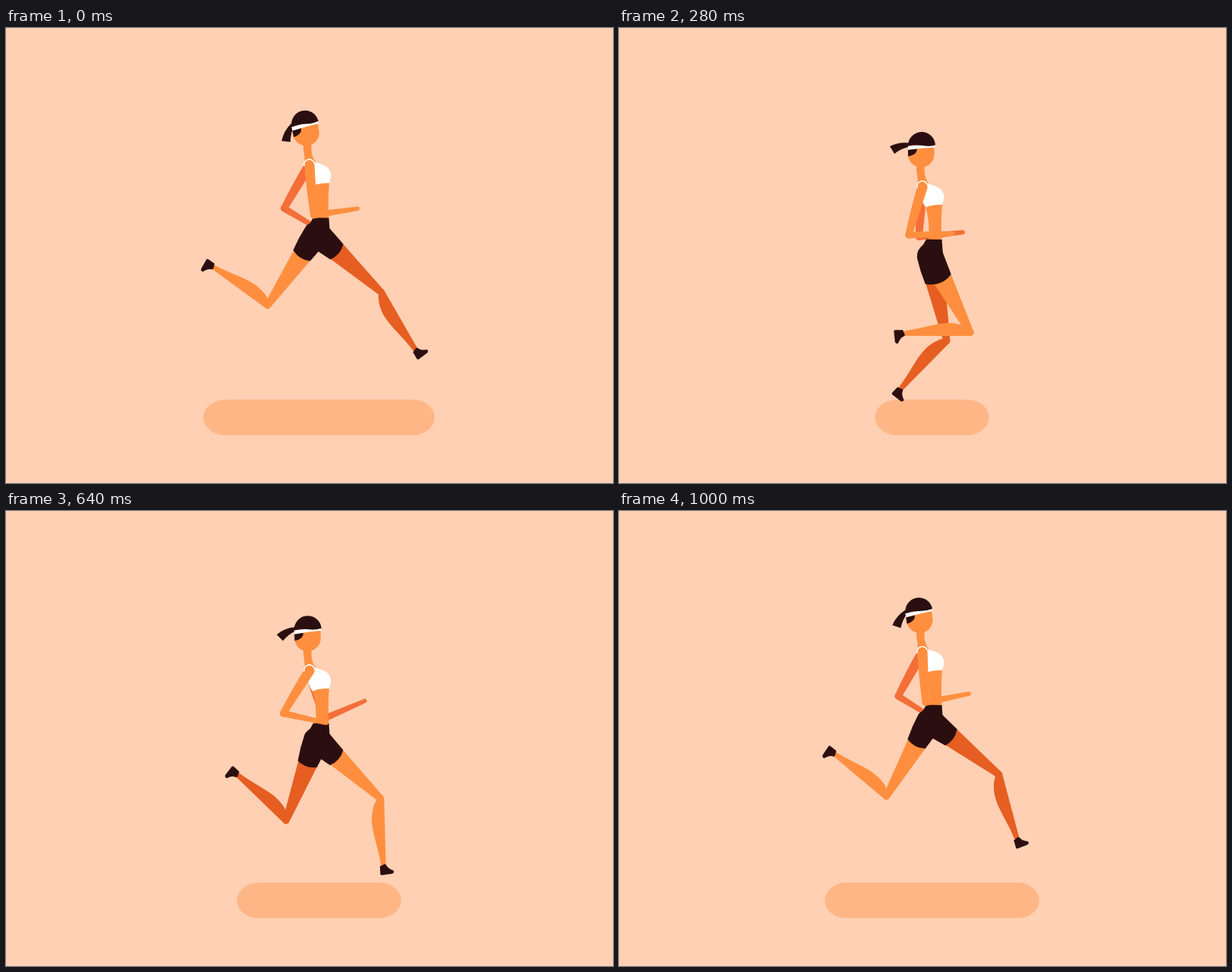
Animation, 800 px wide and 600 px high, one loop 1.04 s. Source, as an HTML page with a canvas:

```html
<!DOCTYPE html>
<html lang="en">
<head>
<meta charset="utf-8">
<title>Runner</title>
<style>
  html, body { margin: 0; width: 100%; height: 100%; overflow: hidden; background: #ffd0b3; }
  canvas { display: block; }
</style>
</head>
<body>
<canvas id="stage" width="800" height="600"></canvas>
<script>
const ctx = document.getElementById('stage').getContext('2d');
const LOOP = 1040, STEP = 40, HALF = 560;
const SKIN = '#ff8f3f', FAR_ARM = '#f46e38', FAR_LEG = '#e65e22', DARK = '#2b0f10';
const { PI, sin, cos } = Math;

// Linear motion through a few key points, closing on the first.
const keys = (times, ...values) => t => {
  const i = times.findLastIndex(time => time <= t);
  const end = times[i + 1] ?? LOOP, next = values[i + 1] ?? values[0];
  return values[i] + (next - values[i]) * (t - times[i]) / (end - times[i]);
};

// The two strides differ in length; each covers half a turn of the gait.
const gait = t => t < HALF ? PI * t / HALF : PI + PI * (t - HALF) / (LOOP - HALF);

// Periodic swing: a mean plus a few harmonics of the gait.
const swing = (mean, c1, s1 = 0, c2 = 0, s2 = 0, c3 = 0) => t => {
  const a = gait(t);
  return mean + c1 * cos(a) + s1 * sin(a) + c2 * cos(2 * a) + s2 * sin(2 * a) + c3 * cos(3 * a);
};

const drop = keys([0, 240, 480, 720], 0, 34.3, 0, 44.5);
const stretch = keys([0, 240, HALF, 720], 1, 0, 1, 0);

// Limb angles in degrees from straight down, forward is positive.
const beats = [0, 160, 400, HALF, 760, 880, 1000];
const near = {
  upper: swing(-16, 18, 0, 0, 0, 3),
  fore: swing(92, 21.5, -15, -15, 4.8),
  thigh: keys(beats, -34.5, -10, 65, 64, 21, 17, -30),
  shank: keys(beats, -125, -131, -47, 25, -31, -102, -129)
};
const far = {
  upper: swing(-4, -24.5, 0, 0, 0, -2),
  fore: swing(91, -17, -10, -15, 12),
  thigh: keys(beats, 47.5, 24, -2, -34, -1, 9.5, 52),
  shank: keys(beats, 31, -13, -74, -133, -133, -16, 16)
};

const shapes = {
  upperArm: 'M-6.6 0A6.6 6.6 0 0 1 6.6 0L4.5 66A4.5 4.5 0 0 1 -4.5 66Q-7 30 -6.6 0Z',
  forearm: 'M-4.5 0A4.5 4.5 0 0 1 4.5 0L2.8 58A2.8 2.8 0 0 1 -2.8 58Z',
  thigh: 'M-16.5 0H16.5L4.5 115A4.5 4.5 0 0 1 -4.5 115Z',
  shank: 'M-4.5 0A4.5 4.5 0 0 1 4.5 0L2.8 88H-3.5C-6 65 -13 45 -13 30C-13 18 -10 8 -4.5 0Z',
  foot: 'M-5 1L1 -1.5Q3 -2 4 1Q6 5 12 7Q14.5 9.5 11 11.5L-3.5 12.8Q-5 12.5 -5 11Z',
  shortLeg: 'M-17.5 0A17.5 17 0 0 1 17 0L13 35Q0 42 -13.5 36Q-17 18 -17.5 0Z',
  waist: 'M405 250L425.5 250.5L427 271H393Q393 264 401 257Z',
  torso: 'M392 148H402.5V160Q403 172 410 179L426 204Q424 225 425.5 252H408Q410 226 404 207L394 184Q394 170 392 160Z',
  bra: 'M394 180Q397 175 404 176Q417 179 424 184Q428 188 428.3 194Q428 200 426 204.5Q413 204 404 208Q397 198 394 180Z',
  strap: 'M393 182A7 7.3 0 0 1 406 177',
  face: 'M381 126H415.5V138A17.2 17.2 0 0 1 381 138Z',
  band: 'M381 126.5L416.5 125V129Q400 129.5 381 132Z',
  sideHair: 'M381 131.7L393 130.5Q393 139 381 140.5Z',
  cap: 'M381 127A18 18 0 0 1 417 126Q409 128 400 126.5Q391 125 381 127Z',
  tail: 'M2 -2Q-12 -4 -24 2L-18 12Q-9 5 2 3Z'
};
for (const name in shapes) shapes[name] = new Path2D(shapes[name]);

function fill(name, color) {
  ctx.fillStyle = color;
  ctx.fill(shapes[name]);
}

function at(x, y, degrees, draw) {
  ctx.save();
  ctx.translate(x, y);
  ctx.rotate(degrees * PI / 180);
  draw();
  ctx.restore();
}

const arm = (side, t, color) => at(400, 181, -side.upper(t), () => {
  fill('upperArm', color);
  at(0, 66, side.upper(t) - side.fore(t), () => fill('forearm', color));
});

const leg = (side, t, color) => at(410, 271, -side.thigh(t), () => {
  fill('thigh', color);
  at(0, 115, side.thigh(t) - side.shank(t), () => {
    fill('shank', color);
    at(0, 88, 0, () => fill('foot', DARK));
  });
});

const shortLeg = (side, t) => at(410, 271, -side.thigh(t), () => fill('shortLeg', DARK));

// The head leans back and the ponytail falls as the stride opens.
function head(t) {
  const open = stretch(t) ** 2, tilt = -11 * open;
  at(398, 152, tilt, () => {
    ctx.translate(-398, -152);
    at(381, 125, -53 * open - tilt, () => fill('tail', DARK));
    fill('face', SKIN);
    fill('sideHair', DARK);
    fill('band', '#fff');
    fill('cap', DARK);
  });
}

function shadow(t) {
  const w = 128 + 177 * stretch(t);
  ctx.fillStyle = '#ffb686';
  ctx.beginPath();
  ctx.roundRect(412.5 - w / 2, 490, w, 47, { x: 29, y: 23.5 });
  ctx.fill();
}

function runner(t) {
  arm(far, t, FAR_ARM);
  leg(far, t, FAR_LEG);
  leg(near, t, SKIN);
  fill('torso', SKIN);
  shortLeg(far, t);
  shortLeg(near, t);
  fill('waist', DARK);
  fill('bra', '#fff');
  arm(near, t, SKIN);
  ctx.strokeStyle = '#fff';
  ctx.lineWidth = 1.6;
  ctx.stroke(shapes.strap);
  head(t);
}

function frame() {
  const t = Math.floor(performance.now() % LOOP / STEP) * STEP;
  ctx.fillStyle = '#ffd0b3';
  ctx.fillRect(0, 0, 800, 600);
  shadow(t);
  at(0, drop(t), 0, () => runner(t));
  requestAnimationFrame(frame);
}
frame();
</script>
</body>
</html>
```
